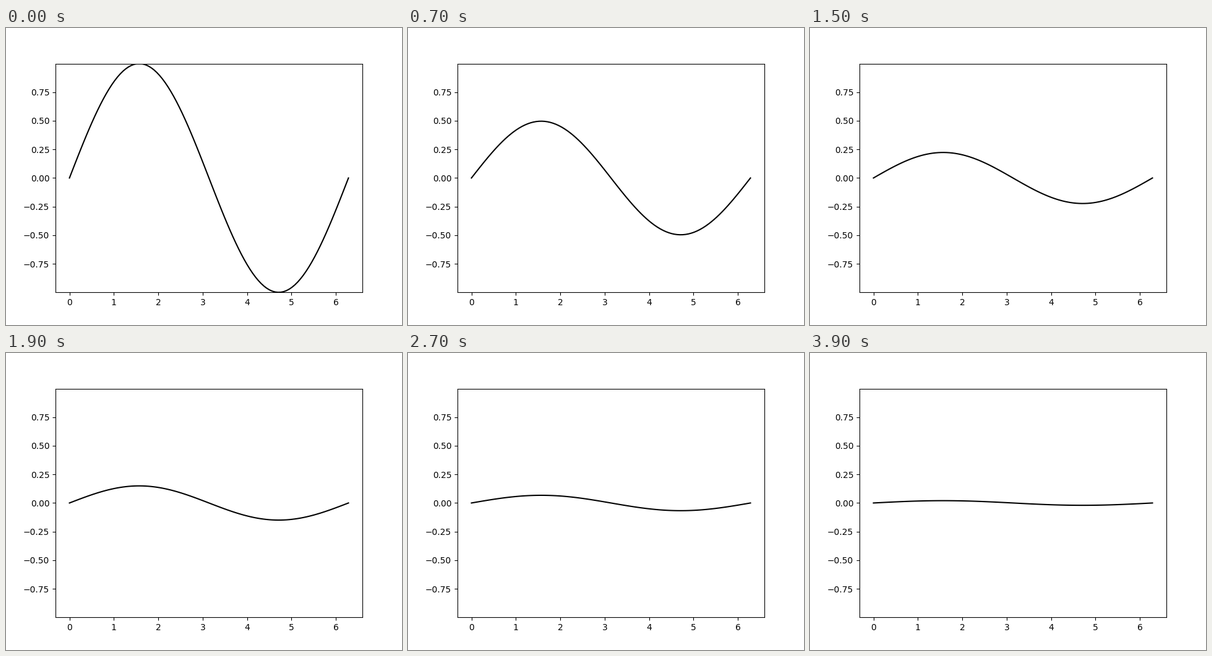
These frames come from a looping animation (640x480 px, 4 s). A matplotlib script:

```python
import numpy as np
import matplotlib.pyplot as plt
from matplotlib.animation import FuncAnimation

FRAMES = 40
INTERVAL = 100  # ms
DECAY = 0.1     # amplitude loss rate per frame

x = np.linspace(0, 2 * np.pi, 100)
wave = np.sin(x)

fig, ax = plt.subplots(figsize=(6.4, 4.8), dpi=100)
line, = ax.plot(x, wave, color="black", linewidth=1.5)
ax.set_ylim(wave.min(), wave.max())


def update(i):
    """Draw the sine wave with exponentially damped amplitude."""
    line.set_ydata(wave * np.exp(-DECAY * i))
    return line,


anim = FuncAnimation(fig, update, frames=FRAMES, interval=INTERVAL,
                     init_func=lambda: update(0), repeat=True)
plt.show()
```
